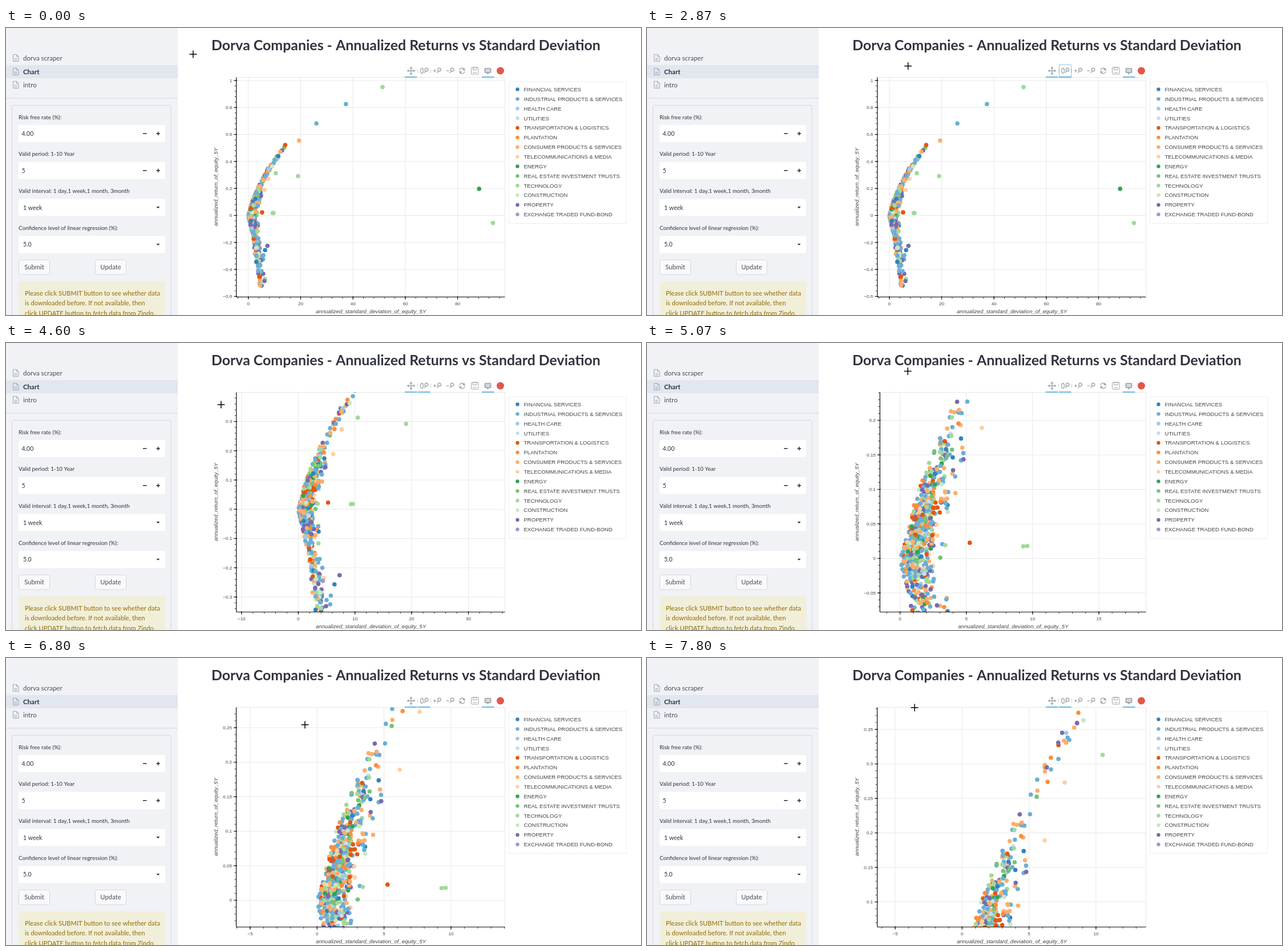
An HTML page with a canvas that plays this animation: 1113 by 503 pixels, repeating every 8000 ms.

```html
<!DOCTYPE html>
<html lang="en">
<head>
<meta charset="utf-8">
<title>Annualized Returns</title>
<style>
html, body { margin: 0; width: 100%; height: 100%; overflow: hidden; background: #fff; }
canvas { display: block; width: 1113px; height: 503px; }
</style>
</head>
<body>
<canvas id="stage"></canvas>
<script>
const W = 1113, H = 503, LOOP = 8000, STEP = 1000 / 15;
const canvas = document.getElementById('stage');
const g = canvas.getContext('2d');
const dpr = window.devicePixelRatio || 1;
canvas.width = W * dpr;
canvas.height = H * dpr;

const UI = 'Lato, "Open Sans", sans-serif';
const PLOT = '"Liberation Sans", Arial, sans-serif';
const TOP = 86.5, BOTTOM = 471.5, RIGHT = 874.5, WIDTH = 470.5;

// name, color, share of the cloud
const SECTORS = [
  ['FINANCIAL SERVICES', '#3182bd', 4], ['INDUSTRIAL PRODUCTS & SERVICES', '#6baed6', 30],
  ['HEALTH CARE', '#9ecae1', 2], ['UTILITIES', '#c6dbef', 1],
  ['TRANSPORTATION & LOGISTICS', '#e6550d', 4], ['PLANTATION', '#fd8d3c', 7],
  ['CONSUMER PRODUCTS & SERVICES', '#fdae6b', 20], ['TELECOMMUNICATIONS & MEDIA', '#fdd0a2', 3],
  ['ENERGY', '#31a354', 4], ['REAL ESTATE INVESTMENT TRUSTS', '#74c476', 2],
  ['TECHNOLOGY', '#a1d99b', 9], ['CONSTRUCTION', '#c7e9c0', 6],
  ['PROPERTY', '#756bb1', 13], ['EXCHANGE TRADED FUND-BOND', '#9e9ac8', 1]
];
const [IND, TRANS, CONS, TELE, ENERGY, TECH, PROP] = [1, 4, 6, 7, 8, 10, 12];

// The few points that stand apart: x, y, sector
const LONERS = [
  [51.3, .951, TECH], [37.3, .825, IND], [26, .682, IND], [19.4, .555, CONS], [14.1, .522, TRANS],
  [88.2, .197, ENERGY], [93.5, -.056, TECH], [19, .292, TECH], [10.5, .313, TECH],
  [9.3, .0175, TECH], [9.6, .018, TECH], [7.66, .273, TELE], [6.17, .189, TELE],
  [5.26, .0226, TRANS], [7.29, -.2255, PROP], [6.33, .295, PROP], [6.64, .292, IND]
];

let seed = 20117;
function rnd() {
  seed = (seed * 1664525 + 1013904223) % 4294967296;
  return seed / 4294967296;
}
const total = SECTORS.reduce((sum, s) => sum + s[2], 0);
function pickColor() {
  let r = rnd() * total;
  return SECTORS.find(s => (r -= s[2]) < 0)[1];
}

// Left border of the cloud at height y
const edge = y => y > 0 ? 11 * y + 30 * y * y : -10 * y - 5 * y * y;

function makePoints() {
  const list = [];
  const scatter = (count, height, wide, tail) => {
    for (let i = 0; i < count; i++) {
      const y = height(rnd());
      list.push([edge(y) + wide * rnd() - tail * Math.log(1 - rnd()), y, pickColor()]);
    }
  };
  scatter(540, u => .015 + (u + rnd() + rnd() - 1.5) * .08, 1.2, .45);
  scatter(130, u => .055 + .11 * u ** 1.3, 1, .4);
  scatter(120, u => -.04 - .31 * u ** 1.4, 1.1, .6);
  scatter(26, u => -.33 - .2 * u, 1, .5);
  scatter(64, u => .165 + .34 * u ** 1.9, .8, .2);
  return list.concat(LONERS.map(([x, y, s]) => [x, y, SECTORS[s][1]]));
}
const points = makePoints();

const clamp = p => Math.max(0, Math.min(1, p));
const mix = (a, b, p) => a + (b - a) * p;

// from time, to time, x, y
const MOVES = [
  [70, 870, 447, 21], [1735, 1930, 497, 17], [2070, 2330, 510, 9], [2470, 3000, 440, 86],
  [3200, 3470, 432, 89], [4130, 4400, 377, 108], [4740, 5270, 507, 13], [6200, 6260, 491, 26],
  [6270, 6470, 443, 80], [6470, 6800, 524, 117], [6800, 7070, 528, 213], [7070, 7400, 480, 89],
  [7730, 7795, 469, 87]
];
function cursorAt(t) {
  let x = 328, y = 46;
  for (const [from, to, toX, toY] of MOVES) {
    const p = clamp((t - from) / (to - from));
    x = mix(x, toX, p);
    y = mix(y, toY, p);
  }
  return [x, y];
}

function viewAt(t) {
  const v = { x0: 425, sx: 4.583, y0: 328.5, sy: 236.5 };
  const zoom = (from, to, factor, x, y, ease = 1) => {
    const k = factor ** (clamp((t - from) / (to - from)) ** ease);
    v.x0 = x + (v.x0 - x) * k;
    v.y0 = y + (v.y0 - y) * k;
    v.sx *= k;
    v.sy *= k;
  };
  const pan = (from, to, dx, dy) => {
    const p = clamp((t - from) / (to - from));
    v.x0 += dx * p;
    v.y0 += dy * p;
  };
  zoom(2870, 3000, 1 / 1.21, 650, 188);
  zoom(3460, 3530, 1 / 1.21, 650, 188);
  zoom(3540, 4130, 1 / 1.8, 632, 183);
  zoom(4270, 4870, 13.48, 566, 228, .67);
  pan(6470, 6800, 106, 47);
  pan(6800, 7070, 7, 124);
  return v;
}

function text(str, x, y, font, color, align = 'left') {
  g.font = font;
  g.fillStyle = color;
  g.textAlign = align;
  g.fillText(str, x, y);
}
function line(x1, y1, x2, y2, color, width = 1) {
  g.strokeStyle = color;
  g.lineWidth = width;
  g.beginPath();
  g.moveTo(x1, y1);
  g.lineTo(x2, y2);
  g.stroke();
}
function plus(x, y, r, color, width) {
  line(x - r, y, x + r, y, color, width);
  line(x, y - r, x, y + r, color, width);
}
function box(x, y, w, h, r, fill, stroke) {
  g.beginPath();
  g.roundRect(x, y, w, h, r);
  if (fill) { g.fillStyle = fill; g.fill(); }
  if (stroke) { g.strokeStyle = stroke; g.lineWidth = 1; g.stroke(); }
}
function dot(x, y, r, color) {
  g.fillStyle = color;
  g.beginPath();
  g.arc(x, y, r, 0, 7);
  g.fill();
}
function ring(x, y, rx, ry, from = 0, to = 7) {
  g.lineWidth = 1.4;
  g.beginPath();
  g.ellipse(x, y, rx, ry, 0, from, to);
  g.stroke();
}
// Triangle with its tip at x, y
function arrow(x, y, angle, size, half, color) {
  g.save();
  g.translate(x, y);
  g.rotate(angle);
  g.fillStyle = color;
  g.beginPath();
  g.lineTo(0, 0);
  g.lineTo(-size, -half);
  g.lineTo(-size, half);
  g.fill();
  g.restore();
}

function pageIcon(y) {
  g.strokeStyle = '#a0a6b6';
  g.lineWidth = 1;
  g.stroke(new Path2D(`M12.5 ${y - 6}h6l3.5 3.5v8.5h-9.5zM18.5 ${y - 6}v3.5h3.5M14.5 ${y + 1}h5M14.5 ${y + 3.5}h5`));
}

function sidebar() {
  const ink = '#31333f', soft = '#4b4d59', rule = '#d3d6de';
  g.fillStyle = '#f0f2f6';
  g.fillRect(0, 0, 301, H);
  g.fillStyle = '#e1e6ef';
  g.fillRect(0, 65, 301, 23);
  ['dorva scraper', 'Chart', 'intro'].forEach((name, i) => {
    const y = 53 + i * 23.5, on = i === 1;
    pageIcon(Math.round(y) - .5);
    text(name, 30, y + 4, `${on ? 700 : 400} 11.5px ${UI}`, on ? ink : soft);
  });
  line(0, 123, 301, 123, rule);
  box(10.5, 135.5, 278.5, 400, 3, null, rule);

  const fields = [
    ['Risk free rate (%):', '4.00'], ['Valid period: 1-10 Year', '5'],
    ['Valid interval: 1 day,1 week,1 month, 3month', '1 week'],
    ['Confidence level of linear regression (%):', '5.0']
  ];
  fields.forEach(([label, value], i) => {
    const y = 185 + i * 64.8;
    text(label, 22, y - 25.5, `9.85px ${UI}`, ink);
    box(22, y - 15, 257, 30, 3, '#fff');
    text(value, i < 2 ? 27.5 : 30, y + 4, `10.5px ${UI}`, ink);
    if (i < 2) {
      line(240, y, 246.5, y, ink, 1.6);
      plus(266.7, y, 3.2, ink, 1.6);
    } else {
      arrow(266.5, y + 1.7, Math.PI / 2, 3.2, 3, ink);
    }
  });
  ['Submit', 'Update'].forEach((label, i) => {
    const x = 22.5 + i * 134;
    box(x, 406.5, 54, 25.5, 3, '#f9f9fb', '#d5d8df');
    text(label, x + 27, 423, `11.3px ${UI}`, soft, 'center');
  });
  box(22, 444, 257, 80, 3, '#f1efda');
  ['Please click SUBMIT button to see whether data',
   'is downloaded before. If not available, then',
   'click UPDATE button to fetch data from Zindo'].forEach((s, i) =>
    text(s, 33, 468.5 + i * 17.6, `11.2px ${UI}`, '#926c05'));
}

function toolbar(t) {
  const gray = '#a1a6a9', y = 75, blue = '#3ba4de';
  const wheel = t > 2460;
  plus(710, y, 6, gray, 1.4);
  for (let i = 0; i < 4; i++) {
    const a = i * Math.PI / 2;
    arrow(710 + 7.5 * Math.cos(a), y + 7.5 * Math.sin(a), a, 3.5, 2.6, gray);
  }
  for (const x of [721.5, 744.5]) line(x, 71, x, 79, '#d5d5d5');

  for (const x of [737, 759.5, 782]) {
    line(x - 1.8, y + .2, x - 4, y + 4, gray, 1.4);
    ring(x, y - 2, 2.8, 2.8);
  }
  ring(729, y, 2.3, 4.5);
  plus(751.5, y, 2.5, gray, 1.3);
  line(771.5, y, 776.5, y, gray, 1.3);

  ring(799.5, y, 4.7, 4.7, 3.4, 5.9);
  ring(799.5, y, 4.7, 4.7, .25, 2.8);
  arrow(805, y, .8, 5, 2.5, gray);
  arrow(794, y, .8 + Math.PI, 5, 2.5, gray);

  box(815.5, 69, 12.5, 12, 1, null, gray);
  box(818.5, 69, 6.5, 4.5, 0, null, gray);
  line(818, 78, 825.5, 78, gray);
  box(839, 70.5, 11, 8, 1, '#b9bcbe', gray);
  arrow(844.5, 81.5, Math.PI / 2, 3, 2.5, gray);
  for (const row of [73, 75.5]) line(841, row, 848, row, '#fff');
  dot(866.5, y, 6.5, '#e2574c');

  for (const x of wheel ? [699, 722, 834] : [699, 834]) line(x, 86, x + 21.5, 86, blue, 1.5);
  if (wheel && t < 4000) {
    g.setLineDash([1.5, 1]);
    box(722.5, 64.5, 21, 22, 0, null, blue);
    g.setLineDash([]);
  }
}

// Round step that comes closest to six intervals
function tickStep(span) {
  const mag = 10 ** Math.floor(Math.log10(span / 6));
  const gap = step => Math.abs(6 - span / step);
  return [1, 2, 5, 10].map(m => m * mag).reduce((a, b) => gap(b) < gap(a) ? b : a);
}
function ticks(lo, hi, step) {
  const out = [];
  for (let i = Math.ceil(lo / step - 1e-6); i * step <= hi + 1e-9; i++) out.push(i * step);
  return out;
}
const label = v => String(parseFloat(v.toFixed(4)) || 0).replace('-', '−');

function chart(v) {
  const small = `8.1px ${PLOT}`, italic = `italic 9.55px ${PLOT}`, ink = '#444';
  const Y = y => v.y0 - y * v.sy;
  const yLo = (v.y0 - BOTTOM) / v.sy, yHi = (v.y0 - TOP) / v.sy;
  const yStep = tickStep(yHi - yLo), ys = ticks(yLo, yHi, yStep);
  g.font = small;
  // Wide labels push the left border; the x range is squeezed to fit
  const left = 387.8 + Math.max(...ys.map(y => g.measureText(label(y)).width));
  const squeeze = (RIGHT - left) / WIDTH;
  const X = x => RIGHT - (RIGHT - v.x0 - x * v.sx) * squeeze;
  const xLo = (RIGHT - WIDTH - v.x0) / v.sx, xHi = (RIGHT - v.x0) / v.sx;
  const xStep = tickStep(xHi - xLo), xs = ticks(xLo, xHi, xStep);

  box(left, TOP, RIGHT - left, BOTTOM - TOP, 0, null, '#e5e5e5');
  xs.forEach(x => line(X(x), TOP, X(x), BOTTOM, '#e8e8e8'));
  ys.forEach(y => line(left, Y(y), RIGHT, Y(y), '#e8e8e8'));

  g.save();
  g.beginPath();
  g.rect(left, TOP, RIGHT - left, BOTTOM - TOP);
  g.clip();
  for (const [x, y, c] of points) dot(X(x), Y(y), 3.8, c);
  g.restore();

  line(left, BOTTOM, RIGHT, BOTTOM, '#111', 1.2);
  line(left, TOP, left, BOTTOM, '#111', 1.2);
  ticks(xLo, xHi, xStep / 5).forEach(x => line(X(x), BOTTOM, X(x), BOTTOM + 3, '#222', .9));
  ticks(yLo, yHi, yStep / 5).forEach(y => line(left - 3, Y(y), left, Y(y), '#222', .9));
  xs.forEach(x => {
    line(X(x), BOTTOM - 1.5, X(x), BOTTOM + 4.5, '#111', 1.1);
    text(label(x), X(x), 485.5, small, ink, 'center');
  });
  ys.forEach(y => {
    line(left - 4.5, Y(y), left + 1.5, Y(y), '#111', 1.1);
    text(label(y), left - 7.5, Y(y) + 2.8, small, ink, 'right');
  });

  text('annualized_standard_deviation_of_equity_5Y', (left + RIGHT) / 2 + .5, 500, italic, ink, 'center');
  g.save();
  g.translate(371, 278.5);
  g.rotate(-Math.PI / 2);
  text('annualized_return_of_equity_5Y', 0, 0, italic, ink, 'center');
  g.restore();
}

function legend() {
  box(881.5, 94, 206, 248.5, 0, '#fff', '#ededed');
  SECTORS.forEach(([name, color], i) => {
    const y = 107.5 + i * 16.87;
    dot(896.5, y, 3.2, color);
    text(name, 907.5, y + 3.4, `9.55px ${PLOT}`, '#444');
  });
}

const HEADS = ['STOCK:', 'SUBSECTOR:', 'SECTOR:', 'Annualized Return:', 'Standard Deviation:'];
function tooltip(x, y, values) {
  const font = `8.8px ${PLOT}`, left = x + 8;
  g.font = font;
  const w = 91 + Math.max(...values.map(s => g.measureText(s).width));
  box(left + .5, y - 39.5, w - .5, 78.5, 0, 'rgba(255,255,255,.95)', '#e3e3e3');
  arrow(left - 5, y, Math.PI, 5, 5, '#909599');
  values.forEach((value, i) => {
    const row = y - 24.7 + i * 13.8;
    text(HEADS[i], left + 83, row, font, '#26aae1', 'right');
    text(value, left + 85, row, font, '#222');
  });
}

function tips(t) {
  const within = (a, b) => t >= a - 5 && t < b - 5;
  if (within(740, 930) || within(1130, 1800))
    tooltip(660, 104, ['VORLANE', 'TECHNOLOGY EQUIPMENT', 'TECHNOLOGY', '0.951', '51.308']);
  if (within(7200, 7530))
    tooltip(709, 194.5, ['TARMIQ', 'METALS', SECTORS[IND][0], '0.292', '6.640']);
  if (within(7530, 7800))
    tooltip(701.5, 191.5, ['LUDOVA', 'PROPERTY', 'PROPERTY', '0.295', '6.330']);
}

function draw(t) {
  g.setTransform(dpr, 0, 0, dpr, 0, 0);
  g.fillStyle = '#fff';
  g.fillRect(0, 0, W, H);
  sidebar();
  text('Dorva Companies - Annualized Returns vs Standard Deviation', 360, 39.3, `700 24.9px ${UI}`, '#31333f');
  chart(viewAt(t));
  toolbar(t);
  legend();
  tips(t);
  plus(...cursorAt(t), 6.5, '#000', 1.5);
}

const start = performance.now();
function tick() {
  const t = (performance.now() - start) % LOOP;
  draw(Math.floor((t + 5) / STEP) * STEP % LOOP);
  requestAnimationFrame(tick);
}
tick();
</script>
</body>
</html>
```
